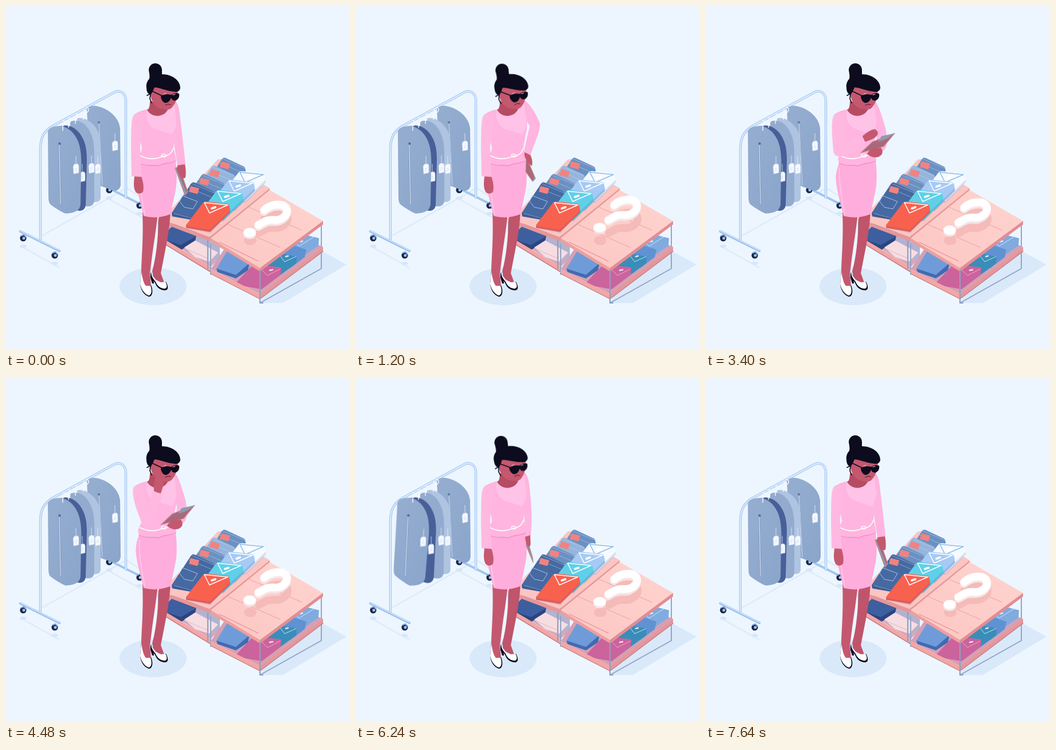
An HTML page that plays this animation: 600 px wide and 600 px high, repeating every 7.68 s.

```html
<!DOCTYPE html>
<html lang="en">
<head>
<meta charset="utf-8">
<title>Shopper</title>
<style>
html, body { margin: 0; width: 100%; height: 100%; overflow: hidden; background: #edf6ff; }
svg { display: block; width: 100vw; height: 100vh; }
.line { fill: none; stroke-linecap: round; stroke-linejoin: round; }
.skin { fill: #c4586f; }
.ink { fill: #0d0b1e; }
.pink { fill: #ffb5df; }

.mark, .head, .bag, .arm-r, .hand-r, .tablet, .tablet-top, .arm-l, .hand-l, .skirt, .leg, .shoe {
  animation: 7.68s ease-in-out infinite;
}
.mark { animation-name: float; animation-duration: .96s; animation-direction: alternate; }
@keyframes float { to { transform: translateY(-10px); } }

.head { animation-name: head; transform-origin: 266px 184px; }
@keyframes head {
  0%, 1% { transform: none; }
  13%, 24% { transform: rotate(-4.6deg); }
  32.5% { transform: rotate(-4.1deg); }
  43%, 64% { transform: none; }
  70.5%, 85% { transform: rotate(-6deg); }
  99%, 100% { transform: none; }
}

.bag { animation-name: swing; animation-delay: var(--d, 0s); }
@keyframes swing {
  0%, 74.5% { transform: none; }
  83% { transform: rotate(var(--a)); }
  89% { transform: rotate(calc(var(--a) * -.25)); }
  93.5%, 100% { transform: none; }
}

.arm-r { animation-name: armR; }
@keyframes armR {
  0%, 6%, 92%, 100% { d: path("M292 163C303 168 303 190 305 205C308 230 311 255 313 276L299 279C297 262 294 250 293 235C292 215 290 190 290 178Z"); }
  15.6% { d: path("M292 163C304 170 315 190 321 205C320 225 310 240 304 262L293 254C296 240 299 225 303 210C298 200 292 190 290 178Z"); }
  25%, 32% { d: path("M292 163C303 170 308 190 316 212C318 245 312 250 303 256L288 248C294 246 299 235 299 225C296 210 292 190 290 178Z"); }
  40.5%, 73% { d: path("M292 163C301 170 306 190 313 212C318 243 316 250 304 256L289 248C294 246 298 235 298 225C296 210 292 190 290 178Z"); }
  81.2% { d: path("M292 163C302 168 303 190 304 205C307 230 307 255 305 274L295 277C295 262 294 250 293 235C292 215 290 190 290 178Z"); }
}
.hand-r { animation-name: handR; }
@keyframes handR {
  0%, 6%, 92%, 100% { d: path("M299 278L312 276C314 285 314 293 313 299C309 303 305 298 302 293C299 287 298 283 299 278Z"); }
  15.6% { d: path("M294 255L304 260C308 267 308 274 307 279C302 277 300 272 297 268C294 264 293 259 294 255Z"); }
  25%, 32% { d: path("M291 251L303 250C308 257 306 263 299 267C293 269 288 266 285 263C284 258 287 254 291 251Z"); }
  40.5%, 73% { d: path("M292 248L305 247C310 254 308 260 301 263C293 266 286 262 281 258C283 253 287 250 292 248Z"); }
  81.2% { d: path("M295 277L304 274C304 281 305 288 304 293C300 295 298 291 297 288C296 284 295 281 295 277Z"); }
}
.tablet { animation-name: tablet; }
@keyframes tablet {
  0%, 6%, 92%, 100% { d: path("M312 330L295 283L302 280L317 324Z"); }
  15.6% { d: path("M308 306L296 289L297 263L313 301Z"); }
  25%, 32% { d: path("M267 276L282 257L312 236L296 262Z"); }
  40.5%, 73% { d: path("M270 256L290 237L329 222L310 245Z"); }
  81.2% { d: path("M309 322L297 293L297 276L308 313Z"); }
}
.tablet-top { animation-name: tabletTop; }
@keyframes tabletTop {
  0%, 6%, 92%, 100% { d: path("M313 330L296 284L297 283L315 326Z"); }
  15.6% { d: path("M308 306L311 298L310 293L313 301Z"); }
  25%, 32% { d: path("M286 257L289 249L312 236L300 247Z"); }
  40.5%, 73% { d: path("M300 237L306 227L329 222L315 232Z"); }
  81.2% { d: path("M309 322L297 289L297 284L308 314Z"); }
}
.arm-l { animation-name: armL; }
@keyframes armL {
  0%, 33%, 81%, 100% { d: path("M224 189C217 195 219 220 218 245C218 262 219 280 219 297L237 298C236 280 234 265 234 245C237 225 240 205 240 190Z"); }
  41.5%, 45% { d: path("M224 189C217 197 220 230 222 250C222 268 240 268 279 240L272 226C262 229 250 236 241 243C242 225 243 205 240 190Z"); }
  52%, 73% { d: path("M224 189C217 195 225 225 234 245C238 268 260 266 272 203L255 196C253 210 250 222 246 228C244 215 243 205 240 190Z"); }
}
.hand-l { animation-name: handL; }
@keyframes handL {
  0%, 33%, 81%, 100% { transform: translate(230px, 297px); }
  41.5%, 45% { transform: translate(275px, 232px) rotate(-114deg) scale(.9); }
  52%, 56% { transform: translate(264px, 200px) rotate(-172deg); }
  59% { transform: translate(264px, 200px) rotate(-166deg); }
  62%, 73% { transform: translate(264px, 200px) rotate(-172deg); }
}
.skirt { animation-name: skirt; }
@keyframes skirt {
  0%, 63.5%, 81%, 100% { d: path("M232 274L296 270C299 295 298 315 294 330L287 363C270 370 255 370 240 366C232 335 224 305 227 293C228 285 230 280 232 274Z"); }
  70.5%, 73.5% { d: path("M232 274L296 270C299 295 299 310 300 330L299 352C285 367 260 370 240 366C232 335 224 305 227 293C228 285 230 280 232 274Z"); }
}
.leg { animation-name: leg; }
@keyframes leg {
  0%, 63.5%, 81%, 100% { d: path("M267 360L287 358C285 390 281 410 277 430L270 466L277 485L258 476L255 463C262 437 265 410 267 360Z"); }
  70.5%, 73.5% { d: path("M267 360L299 350C301 372 290 398 284 412L269 447L275 472L259 464L255 444C267 424 272 395 267 360Z"); }
}
.shoe { animation-name: shoe; transform-origin: 256px 470px; }
@keyframes shoe {
  0%, 63.5%, 81%, 100% { transform: none; }
  70.5%, 73.5% { transform: translate(-1px, -14px) rotate(4deg); }
}
</style>
</head>
<body>
<svg viewBox="0 0 600 600">
<defs>
  <linearGradient id="top" x1="0" y1="1" x2="1" y2="0">
    <stop offset="0" stop-color="#fcc6c3"/><stop offset="1" stop-color="#ffd4cf"/>
  </linearGradient>
  <linearGradient id="bagFill" x1="0" y1="0" x2="1" y2="1">
    <stop offset="0" stop-color="#95aed0"/><stop offset="1" stop-color="#8ba5cb"/>
  </linearGradient>
  <g id="shirt">
    <path d="M314 382L343 344Q345 341 350 341L386 345Q391 346 391 360L356 394L314 387Z" fill="currentColor"/>
    <path d="M314 383L355 390L391 356V361L356 396L314 387Z" fill="#3c5a9a" opacity=".16"/>
    <path class="line" d="M346 343L355 361L387 347Z" fill="#3c5a9a" fill-opacity=".08" stroke="var(--v, #fff)" stroke-width="1.600"/>
    <path class="line" d="M359 353L365 351" stroke="#fff" stroke-width="3.800"/>
  </g>
  <g id="jeans">
    <path d="M289 361L322 311Q325 306 329 308L361 323Q365 325 363 337L330 374L290 367Z" fill="currentColor"/>
    <path d="M289 361L328 369L364 328L363 337L330 374L290 367Z" fill="#203a78" opacity=".28"/>
    <path class="line" d="M319 317L357 333M325 310L363 326M293 362L328 371L362 332" stroke="#c2d9f4" stroke-width=".8" opacity=".65"/>
    <path d="M322 314L337 318L334 328L319 324Z" fill="#f2827f"/>
  </g>
  <g id="caster">
    <ellipse cy="14" rx="6" ry="3" fill="#d7e7f9"/>
    <circle r="5.600" fill="#182549"/><circle cx="1" r="2.500" fill="#9fc2ec"/>
    <path class="line" d="M-4 -4L1 -6L5 -2" stroke="#7da6da" stroke-width="2"/>
  </g>
  <g id="tag">
    <path class="line" d="M0 -22V-6" stroke="#e9f2fc" stroke-width=".8"/>
    <path d="M-3 -8L3 -9L5 -6V7L-4 9L-5 -4Z" fill="#f4f8fe" stroke="#bdcce3" stroke-width=".6"/>
    <path d="M-2 0L2 -1M-2 3L2 2" stroke="#c9d4e6" stroke-width=".7"/>
  </g>
  <path id="hook" class="line" d="M0 14V6C6 4 5 -4 0 -3" stroke="#f4f9ff" stroke-width="1.400"/>
  <path id="q" class="line" d="M450 356C459 347 480 342 488 351C496 362 481 375 466 373C454 372 448 378 440 382"/>
</defs>

<!-- floor shadows -->
<ellipse cx="256.500" cy="489" rx="58.500" ry="33" fill="#d9e9fa"/>
<path d="M443 518H483L594 451L552 428L470 470Z" fill="#d9e9fa"/>
<path class="line" d="M64 400L206 320M28 420L92 456M178 336L240 370M208 316L236 334" stroke="#dceafa" stroke-width="2.500"/>

<!-- rack -->
<path class="line" d="M176 316L241 349" stroke="#a3c5ef" stroke-width="4"/>
<use href="#caster" x="180" y="321"/><use href="#caster" x="233" y="348"/>
<path class="line" d="M60 407V250C60 228 67 218 82 209L188 151C200 145 209 152 209 166V334" stroke="#a9caf2" stroke-width="4.400"/>
<path class="line" d="M60 407V250C60 228 67 218 82 209L188 151C200 145 209 152 209 166V334" stroke="#dcebfd" stroke-width="2"/>
<path class="line" d="M25 393L93 427" stroke="#9dc1ee" stroke-width="4.500"/>
<path class="line" d="M25 392L93 426" stroke="#cfe3fb" stroke-width="1.800"/>
<use href="#caster" x="30" y="405"/><use href="#caster" x="85" y="435"/>

<!-- garment bags, back to front -->
<g class="bag" style="--a:.7deg;--d:.4s;transform-origin:160px 172px">
  <path d="M141 181C143 174 152 173 160 175C181 180 197 195 199 213L200 310C200 318 196 323 187 322L163 313L142 200Z" fill="url(#bagFill)"/>
  <path class="line" d="M162 202L168 312" stroke="#c9daf0" stroke-width="1"/>
  <circle cx="162" cy="203" r="2" fill="#5c769f"/>
  <use href="#tag" x="190" y="244"/>
</g>
<g class="bag" style="--a:.6deg;--d:.3s;transform-origin:130px 192px">
  <path d="M124 196C139 192 156 207 162 222C165 230 165 245 165 260L165 335C164 342 158 343 148 341L124 330Z" fill="#afc4e1"/>
  <use href="#tag" x="160" y="284"/>
</g>
<g class="bag" style="--a:.9deg;--d:.2s;transform-origin:120px 198px">
  <path d="M112 202C128 195 143 208 149 225C153 235 154 245 154 260V340C153 348 147 351 138 349L112 340Z" fill="#93abcf"/>
  <use href="#tag" x="149" y="283"/>
</g>
<g class="bag" style="--a:2.2deg;--d:.15s;transform-origin:110px 205px">
  <path d="M92 211C109 203 126 214 134 231C139 241 141 252 141 268L139 347C138 356 131 359 122 356L98 348Z" fill="#485f98"/>
  <use href="#tag" x="133" y="298"/>
</g>
<g class="bag" style="--a:4.1deg;transform-origin:97px 207px">
  <path d="M73 221C73 211 84 210 94 209C112 211 124 227 128 243C131 254 132 270 131 285L130 346C129 357 120 361 104 362C96 359 87 353 80 348C75 345 74 341 74 330Z" fill="url(#bagFill)"/>
  <path class="line" d="M93 240L95 346" stroke="#6b86b3" stroke-width="2.400"/>
  <path class="line" d="M93 240L95 346" stroke="#e2edfa" stroke-width="1.200"/>
  <circle cx="93.500" cy="240" r="2.200" fill="#536d9a"/>
  <use href="#tag" x="122" y="284"/>
</g>
<use href="#hook" x="99" y="203"/><use href="#hook" x="109" y="198"/><use href="#hook" x="121" y="191"/><use href="#hook" x="135" y="184"/><use href="#hook" x="140" y="180"/>

<!-- rear table: lower shelf -->
<path d="M265 399L357 455L373 440L372 405L300 370Z" fill="#d3a9bd"/>
<path d="M320 409L352 400L373 412V440L350 444Z" fill="#b3b2d0"/>
<path d="M276 398L300 374L335 390L330 409L304 426L281 414Z" fill="#3d5f9f"/>
<path d="M278 408L305 417L331 402L330 409L305 426L281 414Z" fill="#2b4580"/>
<path d="M311 421L330 409L370 430L354 446L330 438Z" fill="#f6dde2"/>
<path class="line" d="M314 424L352 440" stroke="#d8b7c5" stroke-width="1"/>
<path d="M265 400L357 455V464L265 408Z" fill="#f3a6a5"/>
<path class="line" d="M265 408L357 464" stroke="#c67f8c" stroke-width="1.500"/>
<path class="line" d="M266 376V405M352 409V458" stroke="#8ea0c2" stroke-width="2.200"/>

<!-- rear table: top -->
<path d="M265 370L286 356L369 268L375 267L460 318L355 403Z" fill="#fbc5c2"/>
<path d="M265 370L355 403L460 318V324L355 410L265 376Z" fill="#e79698"/>
<use href="#jeans" x="54" y="-43" color="#6b90c2"/>
<use href="#jeans" x="36" y="-29" color="#96b5dc"/>
<use href="#jeans" x="18" y="-14.500" color="#6c90c1"/>
<use href="#jeans" color="#4669a1"/>
<path class="line" d="M308 331L334 341L326 354L311 351L303 341Z" stroke="#a9c4e8" stroke-width="1"/>
<use href="#shirt" x="62" y="-53" color="#f5faff" style="--v:#8fbdea"/>
<use href="#shirt" x="43" y="-38" color="#a6caf4"/>
<use href="#shirt" x="23" y="-20" color="#5fd0e8"/>
<use href="#shirt" color="#f9614f"/>

<!-- front table: lower shelf -->
<path class="line" d="M357 416V468M550 380V458L443 518" stroke="#93a4c5" stroke-width="2"/>
<path d="M357 459L443 502L553 420L462 384L380 425Z" fill="#d3a0b6"/>
<path d="M488 424L505 395L546 405L545 418L510 442Z" fill="#7fabdf"/>
<path class="line" d="M502 408L511 419L538 402" stroke="#d2e5fa"/>
<path d="M464 442L485 412L524 425L521 438L496 457Z" fill="#5f92d2"/>
<path d="M446 460L470 430L507 437L506 449L476 471Z" fill="#3a8db9"/>
<path class="line" d="M476 433L486 446L506 437" stroke="#c3e2f2"/>
<path d="M367 458L388 424L428 445L422 461L401 475L369 464Z" fill="#6f9cd9"/>
<path d="M367 458L401 469L424 449L422 461L401 475L369 464Z" fill="#426ab1"/>
<path d="M402 482L432 450L480 456L479 469L446 494L406 487Z" fill="#cb639d"/>
<path class="line" d="M443 457L456 470L478 459" stroke="#f0a8cc"/>
<path class="line" d="M460 461L465 460M488 437L492 436M513 411L517 410" stroke="#fff" stroke-width="2.500" opacity=".8"/>
<path d="M357 459L443 502L553 420V428L443 511L357 467Z" fill="#f3a6a5"/>
<path d="M443 502L553 420V428L443 511Z" fill="#e5969a"/>
<path class="line" d="M357 467L443 511L553 428" stroke="#c07c8b" stroke-width="1.300"/>

<!-- front table: top -->
<path d="M357 405L460 321L553 375L443 458Z" fill="url(#top)"/>
<path d="M357 405L443 457L553 375V381L443 463L357 411Z" fill="#ee9f9e"/>
<path d="M443 457L553 375V381L443 463Z" fill="#e08e94"/>
<path class="line" d="M372 412L440 445" stroke="#e58f91" stroke-width="1.300"/>
<path class="line" d="M387 381L478 421M424 351L516 391" stroke="#e9a19f" stroke-width="1"/>
<path class="line" d="M443 461V518M443 518H448" stroke="#8ea0c2" stroke-width="2.200"/>

<!-- question mark -->
<g fill="#f4bbb8" stroke="#f4bbb8" transform="translate(1 14)">
  <use href="#q" stroke-width="13.500"/><ellipse cx="425" cy="395" rx="11" ry="8" stroke="none"/>
</g>
<g class="mark">
  <g fill="#f6e6e8" stroke="#f6e6e8" transform="translate(0 3.500)">
    <use href="#q" stroke-width="13.500"/><ellipse cx="425" cy="395" rx="11" ry="8" stroke="none"/>
  </g>
  <g fill="#fff" stroke="#fff">
    <use href="#q" stroke-width="13.500"/><ellipse cx="425" cy="395" rx="11" ry="8" stroke="none"/>
  </g>
</g>

<!-- legs and shoes -->
<path class="leg" fill="#bf546b" d="M267 360L287 358C285 390 281 410 277 430L270 466L277 485L258 476L255 463C262 437 265 410 267 360Z"/>
<g class="shoe">
  <path class="ink" d="M252 465L257 471L258 484H255L252 474Z"/>
  <path class="ink" d="M253 464C258 476 262 481 269 483L279 481C283 488 284 495 278 496C269 496 263 491 260 483C256 477 252 472 253 464Z"/>
  <path d="M253 464C257 474 263 481 270 482L278 481C282 488 281 493 276 493C268 492 264 488 261 481C257 476 253 471 253 464Z" fill="#fff"/>
</g>
<path class="skin" d="M238 360H265C262 390 258 412 255 435L251 466L253 490L238 488L236 467C236 440 240 410 238 360Z"/>
<path class="ink" d="M236 462L239 486C245 490 250 490 253 487C257 496 256 507 249 507C240 504 235 495 234 485Z"/>
<path d="M236 462C238 475 240 484 244 488L252 488C255 496 254 504 249 505C241 502 236 494 234 485Z" fill="#fff"/>

<!-- dress -->
<path class="skirt" fill="#ffaddc" d="M232 274L296 270C299 295 298 315 294 330L287 363C270 370 255 370 240 366C232 335 224 305 227 293C228 285 230 280 232 274Z"/>
<path class="line" d="M233 283C231 305 237 335 242 364" stroke="#ffe3f4" stroke-width="1" stroke-dasharray="3 1.500"/>
<path class="arm-r pink" d="M292 163C303 168 303 190 305 205C308 230 311 255 313 276L299 279C297 262 294 250 293 235C292 215 290 190 290 178Z"/>
<path class="pink" d="M224 189C236 181 245 181 250 179C256 193 276 193 281 180L293 164C299 175 299 195 298 215L292 245L297 269C285 276 275 273 266 279C255 276 245 281 232 274L230 266L237 250C236 230 226 215 224 189Z"/>
<path d="M246 180C241 198 250 211 262 215L290 224C294 216 298 208 297 197L293 170L281 180C276 193 256 193 250 179Z" fill="#ffc3e7"/>
<path class="line" d="M232 274C245 281 255 276 266 279C275 273 285 276 296 270" stroke="#f28cc6" stroke-width="1.400"/>
<path class="line" d="M234 261C248 268 261 268 273 262C282 262 289 257 292 248" stroke="#fff" stroke-width="1.600"/>
<ellipse cx="275" cy="261" rx="4" ry="2.600" fill="none" stroke="#fff" stroke-width="1.400"/>
<path d="M251 166L280 172L283 179C277 195 254 196 246 181Q251 180 251 166Z" fill="#b54c64"/>

<!-- head -->
<g class="head">
  <path class="skin" d="M252 141L300 143C300 156 297 168 291 175C287 181 281 182 275 180C262 179 254 168 252 156Z"/>
  <path class="ink" d="M250 127C251 122 250 118 249 112C249 105 254 100 260 100C268 100 272 106 272 112L272 119C290 119 304 130 304 143C303 149 298 151 291 149C279 148 268 142 259 142C257 147 255 151 252 155C248 154 245 149 245 143C244 137 246 131 250 127Z"/>
  <path class="line" d="M246 156L252 153L251 162L254 169M256 149L273 157" stroke="#0d0b1e" stroke-width="1.700"/>
  <path class="ink" d="M270 157C275 154 282 153 288 155C293 152 298 151 302 153C303 159 300 164 295 165C291 165 289 163 288 160C286 166 282 169 278 169C273 168 270 162 270 157Z"/>
  <path class="line" d="M275 154L279 152M291 155L295 154" stroke="#e7d7e2" stroke-width="1"/>
  <path class="line" d="M278 173C281 171 284 171 287 172" stroke="#6d2340" stroke-width="1.400"/>
</g>

<!-- near arm, tablet, far hand -->
<path class="hand-l skin" d="M-6 0H6C9 9 11 18 9 27C4 32 -3 31 -5 25C-8 18 -7 9 -6 0Z" transform="translate(230 297)"/>
<path class="arm-l" fill="#ffb9e1" d="M224 189C217 195 219 220 218 245C218 262 219 280 219 297L237 298C236 280 234 265 234 245C237 225 240 205 240 190Z"/>
<path class="tablet" fill="#a9697a" stroke="#c98f98" stroke-width="1.200" stroke-linejoin="round" d="M312 330L295 283L302 280L317 324Z"/>
<path class="tablet-top" fill="#9299ac" d="M313 330L296 284L297 283L315 326Z"/>
<path class="hand-r skin" d="M299 278L312 276C314 285 314 293 313 299C309 303 305 298 302 293C299 287 298 283 299 278Z"/>
</svg>
</body>
</html>
```
